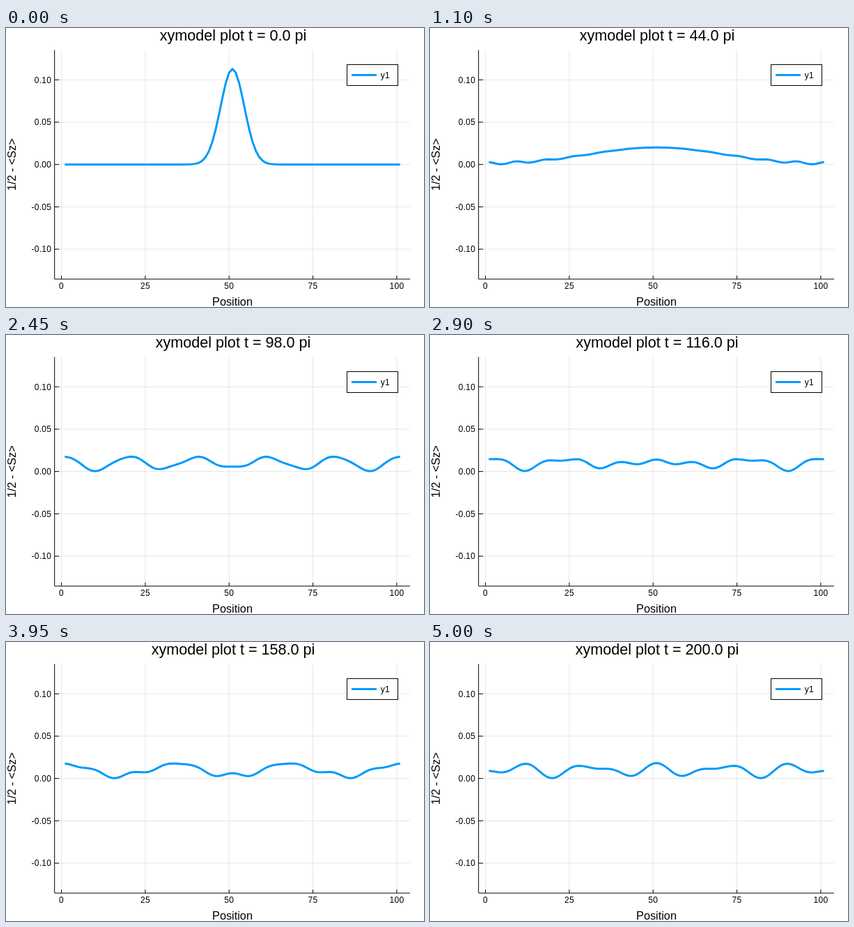
An HTML page that plays this animation: 600x400 px, repeating every 5050 ms.

```html
<!DOCTYPE html>
<html lang="en">
<head>
<meta charset="utf-8">
<title>Spin wave on a ring</title>
<style>
  html, body { margin: 0; width: 100%; height: 100%; overflow: hidden; background: #fff; }
  svg { display: block; font: 12px "Liberation Sans", Arial, sans-serif; }
  .grid { stroke: #000; stroke-opacity: .1; }
  .axis { stroke: #000; fill: none; }
  .curve { stroke: #009afa; stroke-width: 3; stroke-linejoin: round; fill: none; }
  .tick { letter-spacing: .3px; }
  .label { font-size: 16.3px; }
  .title { font-size: 21.6px; }
</style>
</head>
<body>
<svg id="plot" width="600" height="400" viewBox="0 0 600 400"></svg>
<script>
const SITES = 101, CENTER = 51, WIDTH = 5;
const STEP_MS = 50, STEPS = 101;
const LEFT = 69.7, RIGHT = 580, TOP = 31.5, BOTTOM = 360;
const plot = document.getElementById("plot");
const toX = site => 79.6 + 4.813 * site;
const toY = value => 195.7 - 1214 * value;

function add(tag, attributes, text = "") {
  const node = document.createElementNS("http://www.w3.org/2000/svg", tag);
  for (const name in attributes) node.setAttribute(name, attributes[name]);
  node.textContent = text;
  return plot.appendChild(node);
}
const path = (className, d) => add("path", { class: className, d });
const label = (className, x, y, anchor, text, extra) =>
  add("text", { class: className, x, y, "text-anchor": anchor, ...extra }, text);

for (const site of [0, 25, 50, 75, 100]) {
  const x = toX(site);
  path("grid", `M${x} ${TOP}V${BOTTOM}`);
  path("axis", `M${x} ${BOTTOM}v-5`);
  label("tick", x, 374.3, "middle", site);
}
for (const value of [-0.1, -0.05, 0, 0.05, 0.1]) {
  const y = toY(value);
  path("grid", `M${LEFT} ${y}H${RIGHT}`);
  path("axis", `M${LEFT} ${y}h6.5`);
  label("tick", 65.3, y + 4.2, "end", value.toFixed(2));
}
path("axis", `M${LEFT} ${TOP}V${BOTTOM}H${RIGHT}`);
label("label", 325, 398, "middle", "Position");
label("label", 0, 0, "middle", "1/2 - <Sz>", { transform: "translate(14.2 195.8) rotate(-90)" });
const title = label("title", 326, 18.2, "middle", "");
const curve = path("curve", "");

add("rect", { class: "axis", x: 489.5, y: 52.5, width: 73, height: 30, style: "fill:#fff" });
path("curve", "M496 67.5H532");
label("tick", 537.8, 72, "start", "y1");

// Fourier modes of a Gaussian packet; each rotates at its energy cos(k).
const modes = Array.from({ length: SITES }, (_, i) => {
  const k = 2 * Math.PI * (i - (SITES - 1) / 2) / SITES;
  return { k, weight: Math.exp(-((k * WIDTH) ** 2) / 2) };
});
const totalWeight = modes.reduce((sum, mode) => sum + mode.weight, 0);
const peak = 1 / (WIDTH * Math.sqrt(Math.PI));

function density(site, time) {
  let re = 0, im = 0;
  for (const { k, weight } of modes) {
    const amplitude = weight * Math.cos(k * (site - CENTER)) / totalWeight;
    const phase = Math.cos(k) * time;
    re += amplitude * Math.cos(phase);
    im += amplitude * Math.sin(phase);
  }
  return peak * (re * re + im * im);
}

let shownStep = -1;
function draw(now) {
  const step = Math.floor(now / STEP_MS) % STEPS;
  if (step !== shownStep) {
    shownStep = step;
    const turns = 2 * step;
    const points = Array.from({ length: SITES }, (_, i) =>
      `${toX(i + 1).toFixed(2)} ${toY(density(i + 1, turns * Math.PI)).toFixed(2)}`);
    curve.setAttribute("d", "M" + points.join("L"));
    title.textContent = `xymodel plot t = ${turns.toFixed(1)} pi`;
  }
  requestAnimationFrame(() => draw(performance.now() - start));
}
const start = performance.now();
draw(0);
</script>
</body>
</html>
```
